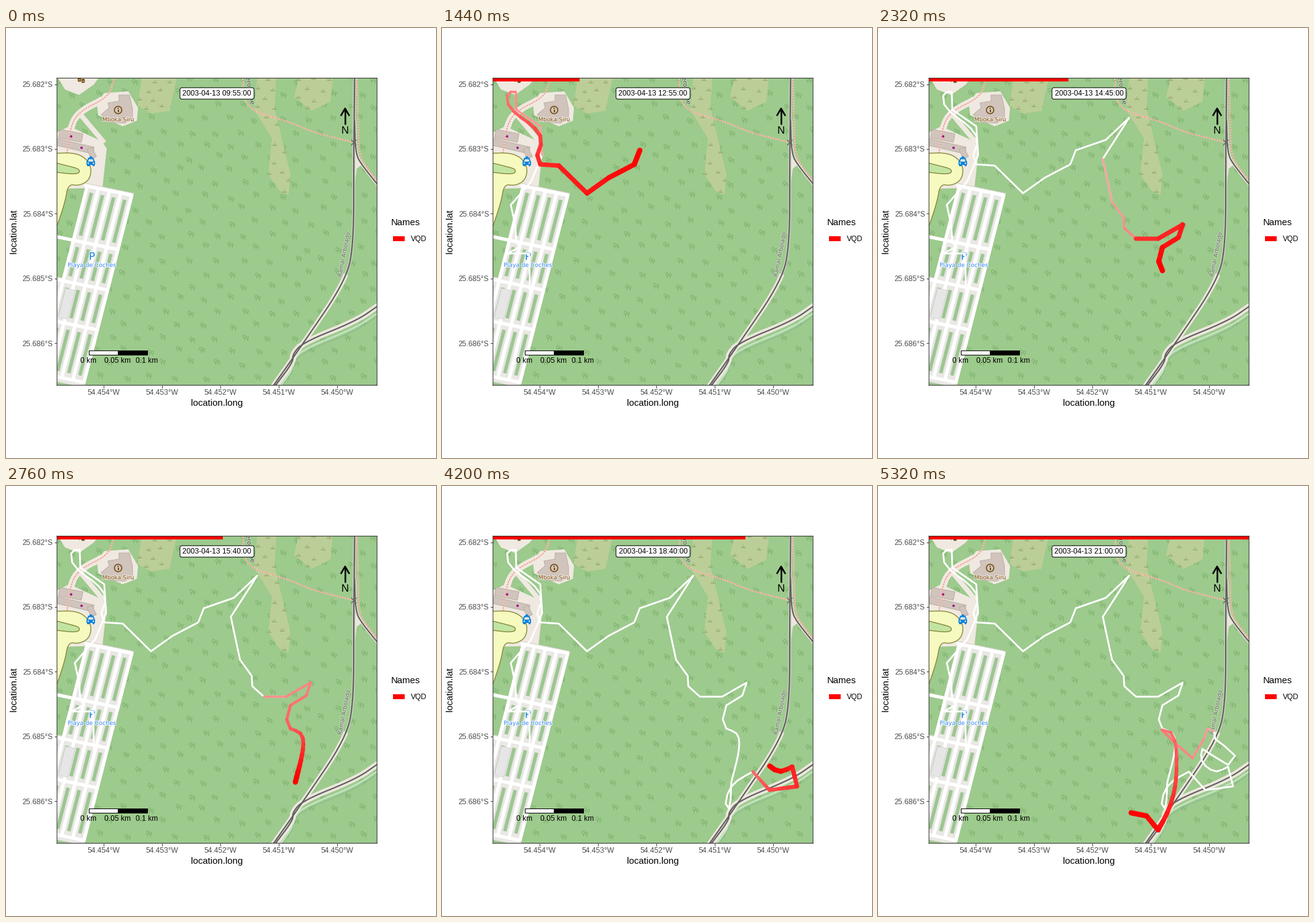
A matplotlib script for the animation above (5360 ms loop, 700 by 700 pixels).

```python
from itertools import count

import numpy as np
import matplotlib.pyplot as plt
from matplotlib.animation import FuncAnimation
from matplotlib.collections import LineCollection
from matplotlib.patches import Circle, FancyBboxPatch, Polygon, Rectangle
from matplotlib.patheffects import withStroke

SIZE, DPI = 700, 100
PX = 72 / DPI                      # points per pixel
FRAMES, STEP_MS, TAIL = 134, 40, 19
X0, X1, Y0, Y1 = 83, 604, 81.6, 581.6
FOREST, TREE, SCRUB, TUFT = "#9dca8d", "#7cb06c", "#bcce98", "#92ab6c"
PAVED, HOUSE, CASING, RAIL = "#efe9e1", "#d0c4bc", "#ece7dc", "#5f5f5f"
BROWN, BLUE, PINK = "#734a08", "#0a84de", "#f98d7c"
MAP_FONT = dict(family="DejaVu Sans")

plt.rcParams["font.family"] = "Liberation Sans"
rng = np.random.default_rng(7)
fig = plt.figure(figsize=(SIZE / DPI, SIZE / DPI), dpi=DPI, facecolor="white")
page = fig.add_axes([0, 0, 1, 1], xlim=(0, SIZE), ylim=(SIZE, 0))
page.axis("off")
ax = fig.add_axes([X0 / SIZE, 1 - Y1 / SIZE, (X1 - X0) / SIZE, (Y1 - Y0) / SIZE],
                  xlim=(X0, X1), ylim=(Y1, Y0), facecolor=FOREST)
layer = count(1)


def put(patch, where=ax):
    patch.set_zorder(next(layer))
    return where.add_patch(patch)


def area(pts, color, edge="none", lw=1.0):
    return put(Polygon(pts, closed=True, fc=color, ec=edge, lw=lw * PX))


def box(x, y, w, h, color, angle=0, edge="none", where=ax):
    return put(Rectangle((x, y), w, h, angle=angle, fc=color, ec=edge, lw=PX), where)


def disc(x, y, r, color):
    return put(Circle((x, y), r, fc=color))


def stroke(pts, color, lw, cap="butt", **kw):
    x, y = np.transpose(pts)
    return ax.plot(x, y, color=color, lw=lw * PX, solid_capstyle=cap,
                   solid_joinstyle="round", zorder=next(layer), **kw)[0]


def strokes(lines, color, lw):
    ax.add_collection(LineCollection(lines, colors=color, linewidths=lw * PX,
                                     zorder=next(layer)))


def dots(pts):
    stroke(pts, "#f3ddd0", 2.6, alpha=0.6)
    stroke(pts, PINK, 1.5, dashes=(1.7, 1.2))


def label(x, y, s, size, color="black", where=ax, halo=None, **kw):
    opts = dict(ha="center", va="center") | kw
    t = where.text(x, y, s, fontsize=size * PX, color=color,
                   zorder=next(layer), **opts)
    t.set_clip_on(where is ax)
    if halo:
        t.set_path_effects([withStroke(linewidth=2 * PX, foreground=halo)])
    return t


def smooth(pts, rounds=3):
    """Chaikin corner cutting that keeps both ends."""
    p = np.array(pts, float)
    for _ in range(rounds):
        a, b = p[:-1], p[1:]
        mid = np.stack([0.75 * a + 0.25 * b, 0.25 * a + 0.75 * b], 1).reshape(-1, 2)
        p = np.vstack([p[:1], mid, p[-1:]])
    return p


def scatter(dx, dy, jitter):
    """Staggered, slightly shaken grid over the map."""
    for row, y in enumerate(np.arange(Y0 + 3, Y1 + 9, dy)):
        for x in np.arange(X0 + 3 + dx / 2 * (row % 2), X1 + 9, dx):
            yield np.array([x, y]) + rng.uniform(-jitter, jitter, 2)


def forest():
    a = np.linspace(0, 2 * np.pi, 12)
    crown = np.c_[np.cos(a), np.sin(a)]
    icon = [crown * (2.1, 2.9) + (-2.3, -1.6), np.array([(-2.3, -1), (-2.3, 4.4)]),
            crown * (1.9, 2.3) + (2.6, 0), np.array([(2.6, 0.4), (2.6, 4.8)])]
    strokes([part + spot for spot in scatter(43, 21, 5) for part in icon], TREE, 0.9)


def scrub():
    fields = [area(p, SCRUB) for p in (
        [(221, 81), (278, 81), (266, 135), (237, 139), (214, 127)],
        [(409, 81), (440, 81), (437, 130), (463, 238), (460, 271), (446, 266),
         (427, 238), (433, 180), (404, 133)],
        [(476, 81), (532, 81), (528, 120), (497, 135), (469, 112)])]
    tuft = np.array([[(-3, 0), (-1, 2)], [(0, -3), (0, 2)], [(3, 0), (1, 2)],
                     [(-4, 2), (4, 2)]])
    spots = [s for s in scatter(26, 15, 4)
             if any(f.get_path().contains_point(s) for f in fields)]
    strokes([part + s for s in spots for part in tuft], TUFT, 0.9)


def paving():
    walk = smooth([(176, 81), (168, 112), (120, 135), (105, 160), (99, 206)])
    area([(84, 81), (151, 81), (143, 92), (119, 109), (96, 100)], PAVED)
    stroke(walk[len(walk) // 3:], PAVED, 11)
    stroke([(118, 137), (160, 187)], PAVED, 8)
    area([(148, 122), (160, 106), (199, 103), (215, 130), (213, 151), (190, 160),
          (150, 142)], PAVED)
    area([(83, 170), (103, 160), (155, 184), (164, 196), (157, 260), (83, 262)], PAVED)
    wall = dict(edge="#bcaea5")
    box(88, 165, 38, 14, HOUSE, 11, **wall)
    box(83, 180, 62, 11, HOUSE, 13, **wall)
    box(140, 194, 17, 9, HOUSE, 65, **wall)
    area([(184, 109), (201, 109), (206, 131), (206, 148), (193, 155), (168, 153),
          (155, 141), (168, 130), (166, 122), (184, 119)], HOUSE, **wall)
    dots(walk)
    disc(106, 176.5, 2, "#a0168c")
    disc(123, 195, 2, "#a0168c")


def yellow_road():
    edge = dict(edge="#85893a", lw=1.4)
    loop = smooth([(75, 204), (118, 203), (139, 222), (137, 247), (119, 257),
                   (101, 254), (96, 285), (75, 345)])
    area(loop, "#f7fabf", **edge)
    area(smooth([(75, 218), (103, 225), (121, 230), (117, 239), (75, 234)]),
         "#c1e4a0", **edge)


def lot(u, v):
    """Point of the slanted car park: u across, v along."""
    return np.array([131, 253]) + u * np.array([77, 16]) + v * np.array([-80, 313])


def parking():
    area([lot(0, 0), lot(1, 0), lot(1, 1.01), lot(-0.5, 1.01), lot(-0.5, 0.505),
          lot(0, 0.49)], "#e9e8e4", "#d6d0ca", 0.8)
    cross = [0.012, 0.294, 0.505, 0.712, 0.985]
    gap, first = 0.235, 0.03
    for block, (a, b) in enumerate(zip(cross, cross[1:])):
        for k in range(-2 if block > 1 else 0, 5):
            u = first + k * gap
            stroke([lot(u, a), lot(u, b)], "white", 5.5)
            if k < 4:
                mid = [lot(u + gap / 2, a + 0.03), lot(u + gap / 2, b - 0.03)]
                stroke(mid, "#d0d6ca", 7)
                stroke(mid, "#9bc690", 5)
    area([lot(0.12, 0.54), lot(0.32, 0.54), lot(0.32, 0.69), lot(0.12, 0.69)],
         "#e6e6e6", "#d2d2d2", 0.8)
    for v in cross:
        stroke([lot(-0.5 if v > 0.1 else 0, v), lot(0.97, v)], "white", 5.5, "round")


def railways():
    main = smooth([(567.5, 80), (566, 220), (566, 350), (554, 410), (482, 516),
                   (434, 584)])
    side = smooth([(567.5, 150), (569, 205), (580, 224), (606, 256)])
    branch = smooth([(606, 452), (570, 477), (483, 512), (466, 532), (468, 543),
                     (437, 584)])
    stroke(branch + (0, 11), "#c3e2c0", 3)
    stroke(branch + (0, 16), "#86b98c", 1)
    area([(568, 205), (580, 222), (571, 229), (567, 262)], CASING)
    stroke(main, "#cdd3c0", 5)
    stroke(main[main[:, 1] > 400], CASING, 8)
    stroke(side, CASING, 5)
    stroke(branch, CASING, 10)
    for rails in (main, side, branch):
        stroke(rails, RAIL, 2.2)
    dots(smooth([(386, 80), (388, 132), (460, 152), (500, 170), (566, 186)]))
    dots(smooth([(571, 80), (573, 140), (574, 205), (586, 226), (606, 251)]))
    for s in (-1, 1):
        stroke([(562, 186.5 - 4.5 * s), (570.5, 186.5 + 4.5 * s)], "#666666", 1.5)


def symbols():
    for x, y in [(119.5, 85), (125.5, 87)]:
        put(FancyBboxPatch((x - 2.4, y - 4), 4.8, 6, fc=BROWN, ec="none",
                           boxstyle="round,pad=0.3,rounding_size=1.8"))
        box(x - 1.4, y - 1, 2.8, 1, PAVED)
    disc(182.5, 133.5, 6.8, BROWN)
    disc(182.5, 133.5, 5.2, HOUSE)
    disc(182.5, 130.8, 1.1, BROWN)
    stroke([(182.5, 132.8), (182.5, 137)], BROWN, 2)
    label(182.5, 149.5, "Mboka Sirú", 9.3, BROWN, halo="#f3ece6", **MAP_FONT)

    area([(131, 223), (131, 218), (134, 211), (142, 211), (145, 218), (145, 223)], BLUE)
    area([(133.5, 217.5), (135, 213.6), (141, 213.6), (142.5, 217.5)], PAVED)
    box(135.6, 208.8, 4.8, 2.4, BLUE)
    for x in (133.8, 142.2):
        box(x - 1.7, 222, 3.4, 3, BLUE)
        disc(x, 220.2, 1.2, PAVED)

    label(140, 372.5, "P", 17, BLUE, halo="white", **MAP_FONT)
    label(140, 386, "Playa de Coches", 9.6, "#2f86f0", halo="white", **MAP_FONT)
    street = dict(halo="#c4dcb8", rotation_mode="anchor") | MAP_FONT
    label(550.5, 369, "Ramal Arbolado", 9.3, "#666666", rotation=79, **street)
    label(397, 99, "dero Ulme", 10, "#444444", rotation=-80, **street)


def furniture():
    stroke([(552, 157), (552, 131)], "black", 2.6)
    stroke([(545, 143), (552, 131), (559, 143)], "black", 2.6)
    label(552, 167, "N", 17)
    for k, color in enumerate(["white", "black"]):
        box(134.5 + 47.5 * k, 524.5, 47.5, 7.5, color, edge="black")
    for k, s in enumerate(["0 km", "0.05 km", "0.1 km"]):
        label(134.5 + 47.3 * k, 542, s, 12)
    put(FancyBboxPatch((285.5, 99.5), 116, 14, fc="white", ec="black", lw=PX,
                       boxstyle="round,pad=2.3,rounding_size=3"))
    return label(343.5, 107, "", 12)


def axes_text():
    ax.set_xticks(159.2 + 95 * np.arange(5), [f"54.{454 - k}°W" for k in range(5)])
    ax.set_yticks(91.5 + 105.4 * np.arange(5), [f"25.{682 + k}°S" for k in range(5)])
    ax.tick_params(length=4 * PX, width=PX, pad=2.4 * PX, color="#333333",
                   labelcolor="#4d4d4d", labelsize=12 * PX)
    for side in ax.spines.values():
        side.set(color="#333333", linewidth=1.07 * PX, zorder=900, snap=False)
    label(343.5, 611, "location.long", 15, where=page)
    label(13.5, 331.5, "location.lat", 15, where=page, rotation=90)
    label(627, 317, "Names", 15, where=page, ha="left")
    box(630, 338.5, 19, 8.5, "red", where=page)
    label(658.5, 343.5, "VQD", 12, where=page, ha="left")


track = np.zeros((FRAMES, 2))


def leg(start, end, *keys, rounds=0):
    """Walk along the keys, one per equal time, or at even speed on a rounded
    path; then rest at the last key."""
    p = smooth(keys, rounds)
    at = np.arange(len(p), dtype=float)
    if rounds:
        at[1:] = np.cumsum(np.hypot(*np.diff(p, axis=0).T))
    now = np.linspace(0, at[-1], end - start + 1)
    track[start:end + 1] = np.c_[np.interp(now, at, p[:, 0]), np.interp(now, at, p[:, 1])]
    track[end:] = p[-1]


leg(0, 3, (143, 432), (142, 367), (107, 367), (127, 356))
leg(12, 22, (127, 356), (121, 349), (119, 320), (112, 288), (145, 250), (163, 207),
    (160, 160), (121, 133), (120, 104), (112, 104), (106, 110))
leg(22, 29, (106, 110), (107, 130), (160, 168), (161, 190), rounds=2)
leg(29, 43, (161, 190), (155, 207), (160, 222), (190, 224), (236, 269), (271, 244),
    (313, 222), (322, 199), (371, 182), (409, 146), (366, 213), (381, 283),
    (400, 309), (401, 326), (420, 343))
leg(52, 58, (420, 343), (456, 343), (496, 320), (489, 341), (463, 357), (457, 380),
    (463, 395))
leg(58, 69, (463, 395), (484, 403), (484, 432), (471, 482), rounds=2)
leg(69, 78, (471, 482), (469, 528), (461, 526), (463, 503), (475, 482), (506, 465),
    rounds=2)
leg(92, 96, (506, 465), (533, 495))
leg(96, 99, (533, 495), (578, 489))
leg(99, 101, (578, 489), (570, 457))
leg(101, 108, (570, 457), (548, 468), (524, 448), (528, 428), rounds=2)
leg(108, 119, (528, 428), (550, 442), (570, 454), (581, 439), (565, 424), (549, 412),
    (547, 399), (536, 395), (531, 411), (512, 443), (482, 417), (462, 397))
leg(119, 131, (462, 397), (485, 403), (487, 480), (474, 528), (456, 560), rounds=2)
leg(131, 133, (456, 560), (437, 537), (412, 532))

for paint in (forest, scrub, paving, yellow_road, parking, railways, symbols):
    paint()
trace = stroke([(0, 0)], "white", 2.9, "round")
tail = LineCollection([], capstyle="round", snap=False, zorder=next(layer))
ax.add_collection(tail, autolim=False)
bar = box(X0, Y0, 0, 5.3, "red")
bar.set_linewidth(0)
clock = furniture()
axes_text()


def draw(i):
    trace.set_data(*track[:i + 1].T)
    ends = np.arange(max(1, i - TAIL + 1), i + 1)
    age = i - ends
    # the tiny offset lets a resting point show as a round dot
    tail.set_segments([[track[k - 1], track[k] + 0.05] for k in ends])
    pale = age / (TAIL + 10)
    tail.set_color(np.c_[np.ones(len(ends)), pale, pale])
    tail.set_linewidth((8.5 - 5.6 * age / (TAIL - 1)) * PX)
    bar.set_width((X1 - X0) * i / (FRAMES - 1))
    minute = 9 * 60 + 55 + 5 * i
    clock.set_text(f"2003-04-13 {minute // 60:02d}:{minute % 60:02d}:00")
    return trace, tail, bar, clock


anim = FuncAnimation(fig, draw, frames=FRAMES, interval=STEP_MS, repeat=True,
                     repeat_delay=0)
plt.show()
```
